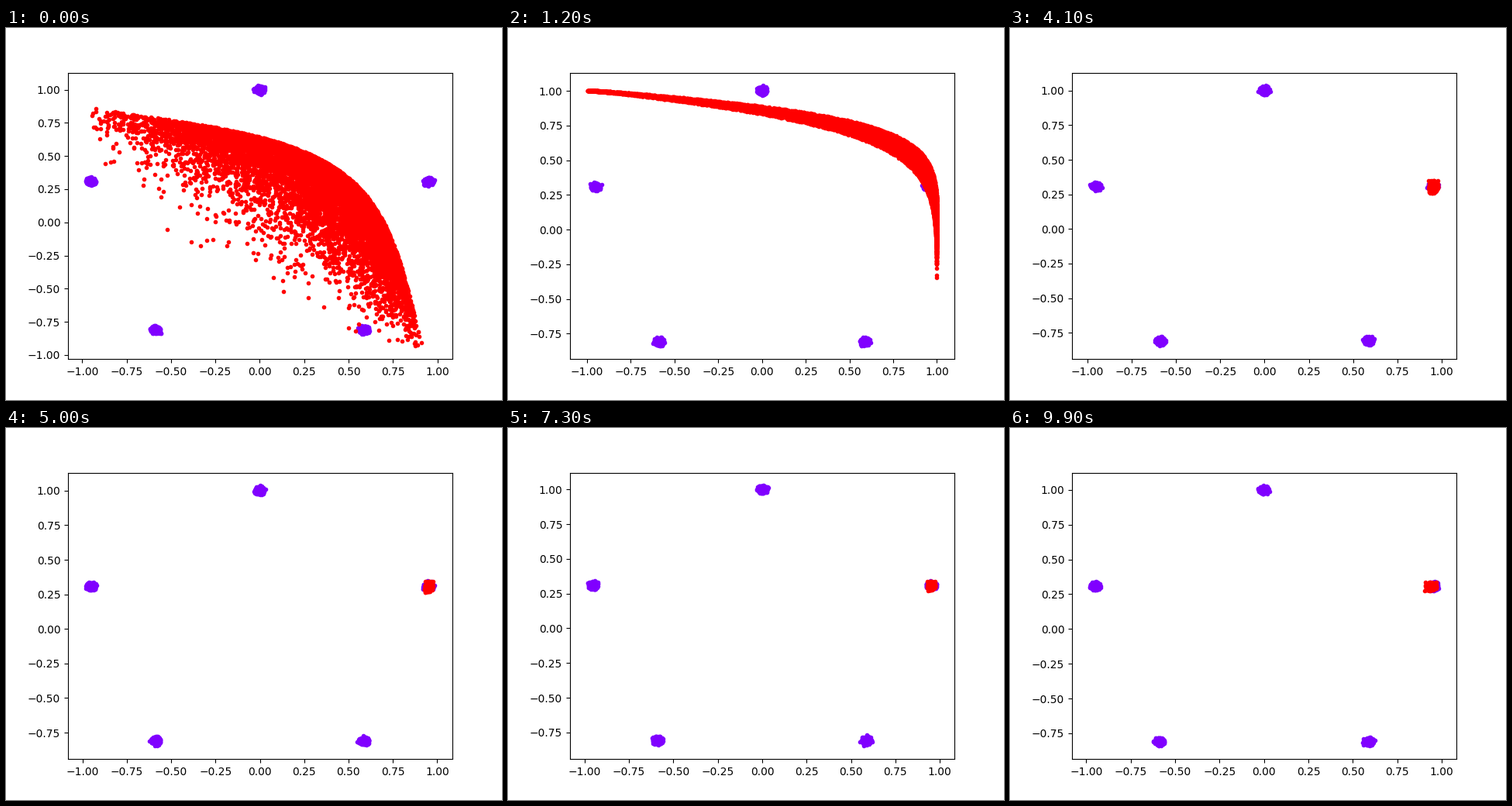
Recreate the animation shown at these times as a matplotlib script. Size 640x480 px, loop 10000 ms.

```python
import numpy as np
import matplotlib.pyplot as plt
from matplotlib.animation import FuncAnimation

FRAMES, INTERVAL = 100, 100
BENT, SETTLED = 12, 27        # when the arc is formed, when the cluster is formed
N_FAKE, N_MODE = 10000, 1000
PURPLE, RED = "#8000ff", "#ff0000"

angles = np.pi / 2 + 2 * np.pi * np.arange(5) / 5
MODES = np.column_stack([np.cos(angles), np.sin(angles)])


# Each stage maps latent noise (a, b) to coordinates before the tanh squash.

def fan(a, b):
    """Wide cloud: parabolic rim across the diagonal, thinning inwards."""
    diff = 0.07 + 0.8 * a
    depth = 0.23 * np.log1p(np.exp(1.7 * b))
    total = 0.9 - 0.12 * (diff - 0.3) ** 2 - depth
    return np.column_stack([total + diff, total - diff]) / 2


def band(a, b):
    """Thin arc, pressed flat against the right edge by the squash."""
    x = 1.2 + 1.25 * a
    half = 0.11 + 0.006 * x ** 2
    y = 1.55 * np.exp(-0.48 * x) - 0.25 - half * np.tanh(0.85 * b)
    return np.column_stack([x, y])


def blob(a, b, frame):
    """Small cluster on one mode, breathing sideways and drifting late."""
    age = max(frame - SETTLED, 0)
    sx = 0.0067 + 0.0015 * np.cos(2 * np.pi * age / 70)
    sy = 0.008 + 0.0085 * np.exp(-age / 20)
    cx = 0.953 - 0.015 * (age / (FRAMES - SETTLED)) ** 6
    tail = 0.8 * np.maximum(b - 1.5, 0)
    return np.arctanh(np.column_stack([cx + sx * (a - tail), 0.305 - sy * b]))


def generated(frame, rng):
    a, b = np.clip(rng.normal(size=(2, N_FAKE)), -3.7, 3.7)
    a[:2], b[:2] = (-3.7, 3.7), -3.7      # keep the extent steady
    if frame < BENT:
        t = frame / BENT
        points = (1 - t) * fan(a, b) + t * band(a, b)
    else:
        t = min((frame - BENT) / (SETTLED - BENT), 1) ** 2
        points = (1 - t) * band(a, b) + t * blob(a, b, frame)
    return np.tanh(points)


fig, ax = plt.subplots(figsize=(6.4, 4.8), dpi=100)
real, = ax.plot([], [], ".", color=PURPLE)
fake, = ax.plot([], [], ".", color=RED)


def update(frame):
    rng = np.random.default_rng(frame)
    samples = MODES[:, None] + rng.normal(0, 0.01, (5, N_MODE, 2))
    real.set_data(*samples.reshape(-1, 2).T)
    fake.set_data(*generated(frame, rng).T)
    ax.relim()
    ax.autoscale_view()
    return real, fake


anim = FuncAnimation(fig, update, frames=FRAMES, interval=INTERVAL,
                     init_func=lambda: update(0), repeat=True, repeat_delay=0)
plt.show()
```
